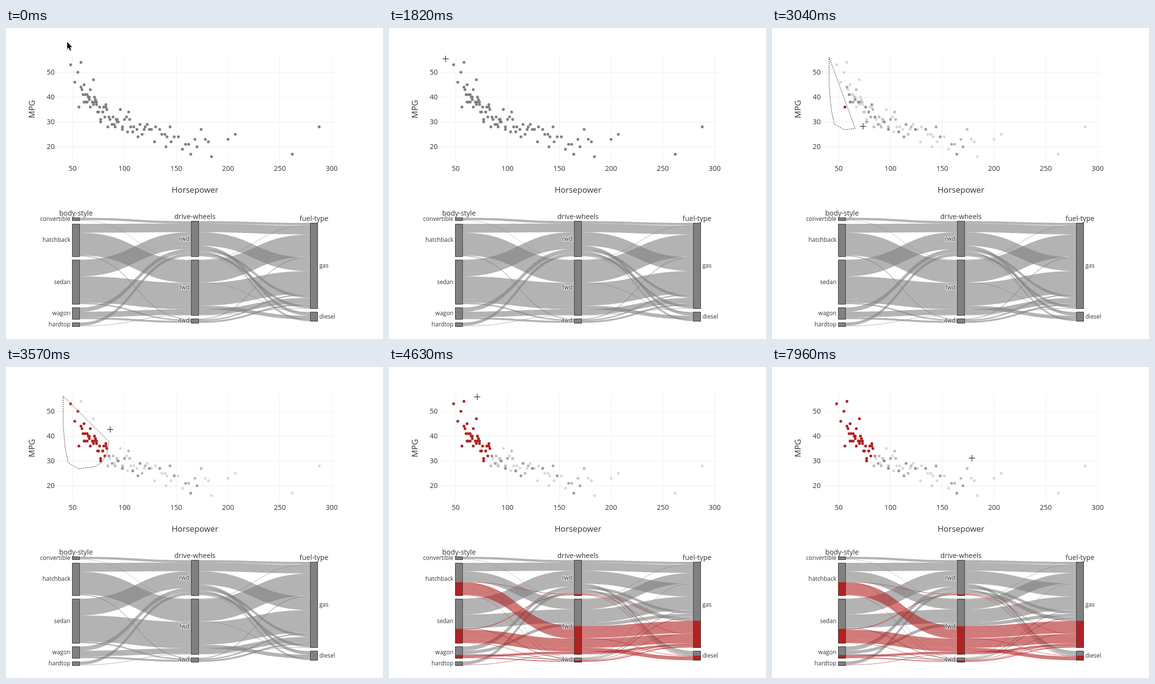
These frames come from a looping animation (776x640 px, 8000 ms). An HTML page with a canvas:

```html
<!DOCTYPE html>
<html lang="en">
<head>
<meta charset="utf-8">
<title>Linked scatter and parallel categories</title>
<style>
html, body { margin: 0; width: 100%; height: 100%; overflow: hidden; background: #fff; }
canvas { display: block; }
</style>
</head>
<body>
<canvas id="stage" width="776" height="640"></canvas>
<script>
const ctx = document.getElementById('stage').getContext('2d');
const LOOP = 8000, GRAY = '#808080', RED = '#b22222', INK = '#333';

// Scatter: a few isolated cars plus a seeded cloud along a falling curve
const px = hp => 30.7 + 2.132 * hp;
const py = mpg => 346.6 - 5.11 * mpg;

function seeded(seed) {
  return () => (seed = (seed * 16807) % 2147483647) / 2147483647;
}

function makePoints() {
  const loners = [[48, 53], [58, 54], [55, 50], [52, 46], [70, 47], [56, 36],
    [140, 20], [184, 16], [200, 23], [207, 25], [262, 17], [288, 28]];
  const pts = loners.map(([hp, mpg]) => ({ x: px(hp), y: py(mpg), n: 1 }));
  const rnd = seeded(4711), count = 84;
  for (let i = 0; i < count; i++) {
    const q = (i + rnd()) / count;
    const hp = Math.round(58 + 60 * q + 65 * q ** 4);
    const mpg = Math.round(12 + 1750 / hp + 6 * (rnd() + rnd() - 1));
    pts.push({ x: px(hp), y: py(mpg), n: 1 + Math.floor(5 * rnd() ** 2) });
  }
  return pts;
}
const points = makePoints();

// Parallel categories
const UNIT = 0.953, GAP = 7, NODE_W = 15;
// Cars per drive (rwd, fwd, 4wd), diesels among rwd and fwd, share of economical cars
const BODIES = [
  { name: 'convertible', cars: [5, 1, 0], diesel: [0, 0], share: 0 },
  { name: 'hatchback', cars: [19, 49, 2], diesel: [0, 1], share: 0.54 },
  { name: 'sedan', cars: [36, 57, 3], diesel: [7, 8], share: 0.41 },
  { name: 'wagon', cars: [9, 12, 4], diesel: [3, 0], share: 0.42 },
  { name: 'hardtop', cars: [7, 1, 0], diesel: [1, 0], share: 1 }
];
const DIMS = [
  { name: 'body-style', x: 136.5, y: 390.4, base: 386, cats: BODIES.map(b => b.name) },
  { name: 'drive-wheels', x: 381.5, y: 397.4, base: 393, cats: ['rwd', 'fwd', '4wd'] },
  { name: 'fuel-type', x: 626.5, y: 401.1, base: 397, cats: ['gas', 'diesel'] }
];

// Few rear-wheel cars are economical; all front-wheel diesels are.
const flows = BODIES.flatMap((body, b) => body.cars.flatMap((cars, drive) => {
  const diesel = body.diesel[drive] || 0;
  return [cars - diesel, diesel].map((n, fuel) => {
    const share = (fuel ? 1 : body.share) * (drive ? 1 : 0.075);
    return { at: [b, drive, fuel], n, hot: Math.round(n * share) };
  });
}));

function layout(linked) {
  const sum = (list, key) => UNIT * list.reduce((s, f) => s + f[key], 0);
  const nodes = DIMS.map((dim, d) => {
    let y = dim.y;
    return dim.cats.map((name, c) => {
      const mine = flows.filter(f => f.at[d] === c);
      const node = { name, y, h: sum(mine, 'n'), hot: linked ? sum(mine, 'hot') : 0, next: y };
      y += node.h + GAP;
      return node;
    });
  });
  const bands = [];
  for (const color of [GRAY, RED]) {
    for (const f of flows) {
      const hot = linked ? f.hot : 0;
      const h = UNIT * (color === RED ? hot : f.n - hot);
      if (!h) continue;
      const ys = f.at.map((c, d) => (nodes[d][c].next += h) - h);
      bands.push({ color, h, ys });
    }
  }
  return { nodes, bands };
}
const plain = layout(false), split = layout(true);

// Pointer
const LASSO_START = 1910, LASSO_STEP = 180, LASSO_LAG = 110, LINKED = 4630;
const LASSO = [[117.5, 60], [117.5, 80], [117.5, 119], [122, 168], [128, 197],
  [149, 209.5], [183, 205], [198, 196], [208, 178], [215, 134], [213, 101],
  [201, 81], [181.5, 61.5]];
const LASSO_END = LASSO_START + LASSO_STEP * (LASSO.length - 1);
// Eased moves: start, end, target
const BEFORE = [[270, 810, 116.5, 67], [810, 1190, 116.5, 61.5],
  [1190, 1280, 116.5, 63.5], [1820, 1910, 117.5, 60]];
const AFTER = [[6310, 6880, 401.5, 164.5], [7600, 7910, 411.5, 187.5]];

const clamp = u => Math.min(1, Math.max(0, u));
const mix = (a, b, u) => [a[0] + (b[0] - a[0]) * u, a[1] + (b[1] - a[1]) * u];

function follow(start, moves, t) {
  return moves.reduce((pos, [t0, t1, x, y]) => {
    const u = clamp((t - t0) / (t1 - t0));
    return mix(pos, [x, y], u * u * (3 - 2 * u));
  }, start);
}

function lassoAt(t) {
  const s = Math.max(0, (t - LASSO_START) / LASSO_STEP);
  const i = Math.min(LASSO.length - 2, Math.floor(s));
  return mix(LASSO[i], LASSO[i + 1], clamp(s - i));
}

function pointerAt(t) {
  if (t < LASSO_START) return follow([126, 29], BEFORE, t);
  if (t < LASSO_END) return lassoAt(t);
  return follow(LASSO[LASSO.length - 1], AFTER, t);
}

// The outline trails the pointer slightly.
function lassoPath(t) {
  const end = t - LASSO_LAG;
  const path = new Path2D();
  LASSO.forEach(([x, y], i) => {
    if (!i || LASSO_START + i * LASSO_STEP < end) path.lineTo(x, y);
  });
  path.lineTo(...lassoAt(end));
  path.closePath();
  return path;
}

function stepped(t) {
  return Math.max(0, Math.floor((t - 76) / 87) * 87 + 80);
}

function text(str, x, y, size, align = 'center') {
  ctx.font = size + 'px "Open Sans", sans-serif';
  ctx.textAlign = align;
  ctx.fillStyle = INK;
  ctx.fillText(str, x, y);
}

function haloText(str, x, y, align) {
  ctx.font = '12px "Open Sans", sans-serif';
  ctx.textAlign = align;
  ctx.lineJoin = 'round';
  ctx.lineWidth = 3;
  ctx.strokeStyle = 'rgba(255,255,255,0.6)';
  ctx.strokeText(str, x, y);
  text(str, x, y, 12, align);
}

function drawAxes() {
  for (let hp = 50; hp <= 300; hp += 50) {
    ctx.fillStyle = '#eee';
    ctx.fillRect(Math.floor(px(hp)), 56, 1, 221);
    text(hp, px(hp), 294, 14.4);
  }
  for (let mpg = 20; mpg <= 50; mpg += 10) {
    ctx.fillStyle = '#eee';
    ctx.fillRect(104, Math.floor(py(mpg)), 573, 1);
    text(mpg, 100.3, py(mpg) + 5, 14.4, 'right');
  }
  text('Horsepower', 389, 339, 16.8);
  ctx.save();
  ctx.translate(58.5, 167);
  ctx.rotate(-Math.PI / 2);
  text('MPG', 0, 0, 16.8);
  ctx.restore();
}

function drawPoints(lasso) {
  for (const p of points) {
    const hot = lasso && ctx.isPointInPath(lasso, p.x, p.y);
    ctx.globalAlpha = !lasso || hot ? 1 : 1 - 0.7 ** p.n;
    ctx.fillStyle = hot ? RED : GRAY;
    ctx.beginPath();
    ctx.arc(p.x, p.y, 2.9, 0, 7);
    ctx.fill();
  }
  ctx.globalAlpha = 1;
}

// Adds one edge of a band: straight across nodes, curved between them.
function edge(ys, dy, order) {
  const back = order[0] > 0;
  const enter = d => DIMS[d].x + (back ? NODE_W : 0);
  const leave = d => DIMS[d].x + (back ? 0 : NODE_W);
  order.forEach((d, i) => {
    const x = enter(d), y = ys[d] + dy;
    if (i) {
      const prev = order[i - 1], mid = (leave(prev) + x) / 2;
      ctx.bezierCurveTo(mid, ys[prev] + dy, mid, y, x, y);
    } else ctx.lineTo(x, y);
    ctx.lineTo(leave(d), y);
  });
}

function drawCategories({ nodes, bands }) {
  ctx.globalAlpha = 0.6;
  for (const b of bands) {
    ctx.fillStyle = b.color;
    ctx.beginPath();
    edge(b.ys, 0, [0, 1, 2]);
    edge(b.ys, b.h, [2, 1, 0]);
    ctx.fill();
  }
  ctx.globalAlpha = 1;
  DIMS.forEach((dim, d) => {
    const right = d === DIMS.length - 1;
    for (const n of nodes[d]) {
      const top = Math.round(n.y) + 0.5, bottom = Math.round(n.y + n.h) + 0.5;
      ctx.fillStyle = GRAY;
      ctx.fillRect(dim.x, top, NODE_W, bottom - top);
      ctx.fillStyle = RED;
      ctx.fillRect(dim.x, bottom - n.hot, NODE_W, n.hot);
      ctx.strokeStyle = '#333';
      ctx.lineWidth = 1;
      ctx.strokeRect(dim.x, top, NODE_W, bottom - top);
      haloText(n.name, right ? 645 : dim.x - 4, n.y + n.h / 2 + 4, right ? 'left' : 'right');
    }
    text(dim.name, dim.x + NODE_W / 2, dim.base, 14.4);
  });
}

function drawLasso(path) {
  ctx.lineWidth = 1;
  ctx.strokeStyle = '#fff';
  ctx.stroke(path);
  ctx.strokeStyle = '#000';
  ctx.setLineDash([2, 2]);
  ctx.stroke(path);
  ctx.setLineDash([]);
}

function drawArrow(x, y) {
  ctx.save();
  ctx.translate(x, y);
  ctx.beginPath();
  [[0, 0], [0, 14], [3, 11], [5.6, 17], [8, 16], [5.5, 10.3], [10, 10.3]]
    .forEach(p => ctx.lineTo(...p));
  ctx.closePath();
  ctx.lineJoin = 'round';
  ctx.lineWidth = 2;
  ctx.strokeStyle = '#fff';
  ctx.shadowColor = 'rgba(0,0,0,0.35)';
  ctx.shadowBlur = 2;
  ctx.shadowOffsetY = 1;
  ctx.stroke();
  ctx.shadowColor = 'transparent';
  ctx.fillStyle = '#000';
  ctx.fill();
  ctx.restore();
}

function drawCross(x, y) {
  const cx = Math.floor(x), cy = Math.floor(y);
  ctx.fillStyle = '#000';
  ctx.fillRect(cx - 6, cy, 13, 1);
  ctx.fillRect(cx, cy - 6, 1, 13);
}

function draw(t) {
  const now = stepped(t), [x, y] = pointerAt(now);
  const lasso = now > LASSO_START ? lassoPath(now) : null;
  ctx.fillStyle = '#fff';
  ctx.fillRect(0, 0, 776, 640);
  drawAxes();
  drawPoints(lasso);
  drawCategories(t < LINKED ? plain : split);
  if (lasso && t < LINKED) drawLasso(lasso);
  if (y < 57) drawArrow(x, y);
  else drawCross(x, y);
}

function tick() {
  draw(performance.now() % LOOP);
  requestAnimationFrame(tick);
}
tick();
</script>
</body>
</html>
```
